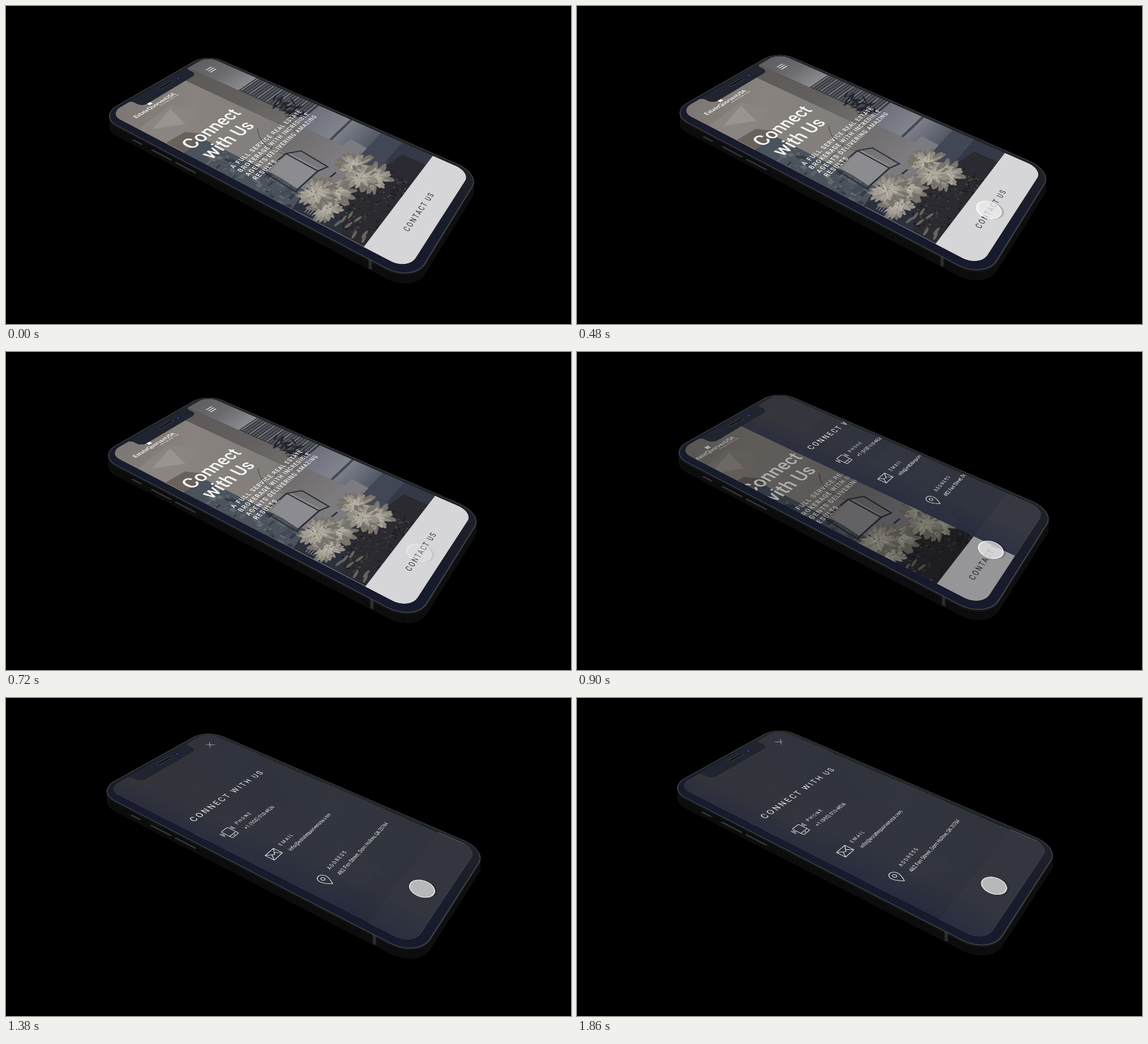
These frames come from a looping animation (998 by 561 pixels, 1.92 s). An HTML page:

```html
<!DOCTYPE html>
<html lang="en">
<head>
<meta charset="utf-8">
<title>Phone contact menu</title>
<style>
html, body { margin: 0; width: 100%; height: 100%; overflow: hidden; background: #000; }
#stage { position: relative; width: 998px; height: 561px; overflow: hidden; }
.plane { position: absolute; left: 0; top: 0; transform-origin: 0 0; }
svg { position: absolute; }
text { font-family: Roboto, "Liberation Sans", sans-serif; white-space: pre; }
</style>
</head>
<body>
<div id="stage"></div>
<script>
const W = 375, H = 812, PAD = 40, LOOP = 1920, STEP = 60;
const RASTER = .7; // drawn close to its size on screen, so text stays crisp
const stage = document.getElementById('stage');

// plane corners: top left, top right, bottom right, bottom left
const START = [[183, 189.5], [356, 89], [828, 297], [719.5, 469.5]];
const END = [[178, 154.5], [356, 55], [842, 264.5], [730, 434.5]];

let seed = 7;
const rnd = (lo = 0, hi = 1) => {
  seed = (seed * 16807) % 2147483647;
  return lo + (hi - lo) * seed / 2147483647;
};
const many = (n, fn) => Array.from({ length: n }, (_, i) => fn(i)).join('');
const label = (x, y, size, str, gap = 0, attrs = '') =>
  `<text x="${x}" y="${y}" font-size="${size}" letter-spacing="${gap}" ${attrs}>${str}</text>`;
const shape = (points, fill) => `<polygon points="${points}" fill="${fill}"/>`;
const box = (x, y, w, h, fill) => `<rect x="${x}" y="${y}" width="${w}" height="${h}" fill="${fill}"/>`;
const fade = (id, dir, ...colors) => `<linearGradient id="${id}" ${dir}>`
  + colors.map((c, i) => `<stop offset="${i / (colors.length - 1)}" stop-color="${c}"/>`).join('') + '</linearGradient>';

function bloom(cx, cy, r) {
  const tones = ['#77736b', '#938f85', '#a5a196', '#b5b1a5', '#c0bcb0'];
  return `<g transform="translate(${cx} ${cy}) scale(1.2 .85)">` + many(75, i => {
    const out = r * (1 - i / 90), len = out * rnd(.38, .52);
    return `<ellipse cx="${out * .55}" rx="${len}" ry="${len * rnd(.2, .34)}" fill="${tones[i * 5 / 75 | 0]}"
      stroke="#8a867c" stroke-width=".5" transform="rotate(${rnd(0, 360)})"/>`;
  }) + many(6, () => `<circle cx="${rnd(-r, r) * .5}" cy="${rnd(-r, r) * .5}" r="1.8" fill="#6a5d4c"/>`) + '</g>';
}

function room() {
  return box(-10, 0, 480, 812, 'url(#wall)')
    + shape('0,95 120,85 150,150 60,185 0,180', '#8a8580')
    + shape('20,120 110,95 85,165', '#98948f')
    + shape('0,180 60,185 90,235 0,250', '#69625c')
    // beam and ceiling
    + box(235, 0, 60, 430, 'url(#beam)')
    + box(292, 0, 180, 175, 'url(#ceiling)')
    // window with blinds and plant
    + box(292, 172, 180, 205, '#3b3e45')
    + many(22, i => box(296, 176 + i * 9, 170, 3.2, i % 3 ? '#5d6068' : '#83858b'))
    + many(24, () => `<ellipse cx="${rnd(290, 345)}" cy="${rnd(265, 365)}" rx="15" ry="2.5" fill="#202229" transform="rotate(${rnd(-60, 60)} 315 310)"/>`)
    // sofa and floor
    + box(262, 375, 210, 185, 'url(#sofa)')
    + box(262, 470, 210, 7, '#454854')
    + box(150, 400, 115, 195, 'url(#table)')
    + shape('0,500 300,510 290,600 0,600', '#7c7b80')
    + box(0, 590, 470, 230, '#353947')
    + box(190, 560, 280, 60, '#424756')
    // city behind the left window
    + box(-5, 235, 72, 300, '#4a525c')
    + many(46, () => box(rnd(-4, 48), rnd(270, 515), rnd(6, 20), rnd(4, 16),
        ['#343c46', '#414b55', '#58626c', '#66686a'][Math.floor(rnd(0, 4))]))
    + many(60, () => box(rnd(0, 62), rnd(290, 525), 2, 2, '#85857f'))
    + shape('0,530 80,520 75,690 0,700', '#2b303c')
    // branches
    + '<path d="M150 430Q120 360 185 310M135 400Q105 370 70 390M140 380Q185 370 205 345" fill="none" stroke="#4a4643" stroke-width="1.6"/>'
    // chair
    + shape('72,425 155,420 150,505 60,508', '#8b8b90')
    + '<path d="M60 415L148 418L142 510L50 506ZM148 418L180 440L170 520L142 510M50 506L60 535L165 545" fill="none" stroke="#2c2f37" stroke-width="4"/>'
    + many(9, i => box(8, 555 + i * 6, 55, 2.5, '#777a80'))
    // foliage and flowers
    + shape('0,650 120,600 330,640 330,705 0,705', '#2b2a30')
    + many(150, () => `<circle cx="${rnd(20, 260)}" cy="${rnd(625, 702)}" r="${rnd(1, 3.2)}" fill="${rnd() < .5 ? '#4b423d' : '#1b1c22'}"/>`)
    + many(8, () => `<ellipse cx="${rnd(0, 70)}" cy="${rnd(630, 690)}" rx="13" ry="3" fill="#68655f" transform="rotate(${rnd(-12, 12)} 50 670)"/>`)
    + bloom(48, 588, 48) + bloom(205, 622, 56) + bloom(105, 575, 54)
    + bloom(215, 570, 58) + bloom(75, 545, 56) + bloom(185, 600, 50);
}

function page() {
  const lines = ['A FULL SERVICE REAL ESTATE', 'BROKERAGE WITH INCREDIBLE', 'AGENTS DELIVERING AMAZING', 'RESULTS.'];
  return room()
    + '<g fill="#f4f4f4">'
    + label(26, 62, 16.5, 'EstateQuorvenUSA', 0, 'font-weight="700" style="font-family:Lato,sans-serif"')
    + label(104, 70, 5.5, 'YOUR HOME SEARCH TEAM')
    + box(88, 36, 11, 11, '#f0f0f0')
    + many(3, i => box(313, 43 + i * 8, 25, 2.6, '#f4f4f4'))
    + label(18, 242, 52, 'Connect', 0, 'font-weight="500"')
    + label(19, 299, 52, 'with Us', 0, 'font-weight="500"')
    + lines.map((s, i) => label(26, 356 + i * 20.8, 17, s, 2.4, 'font-weight="500"')).join('')
    + '</g>'
    + box(-5, 703, 480, 115, '#d6d6d9')
    + label(95, 760, 18.5, 'CONTACT US', 4, 'fill="#2b2c33"');
}

function menu() {
  const row = (y, head, body) => label(89, y, 13, head, 3.3) + label(88, y + 27, 14, body);
  return box(0, 0, W, H, 'url(#menuFill)')
    + box(0, 0, W, H, 'url(#tint)')
    + '<g fill="#f2f2f4">'
    + label(33, 238, 23.5, 'CONNECT WITH US', 5.1)
    + row(318, 'PHONE', '+1 (555) 010-4826')
    + row(439, 'EMAIL', 'info@estatequorvenusa.com')
    + row(565, 'ADDRESS', '482 Fen Street, Dorn Hollow, QK 20764')
    + '</g><g fill="none" stroke="#e4e4e6" stroke-width="1.8">'
    + '<path d="M46 307h17q3 0 3 3v26q0 3-3 3h-17q-3 0-3-3v-26q0-3 3-3zM43 331h23M52 335h5M39 312v9M35 309v15M70 312v9M74 309v15"/>'
    + '<path d="M39 430h32v24h-32zM39 430l16 14l16-14M39 454l11-14M71 454l-11-14"/>'
    + '<path d="M54 592Q42 577 42 568A12 12 0 0 1 66 568Q66 577 54 592Z"/><circle cx="54" cy="568" r="4.5"/>'
    + '</g><path id="close" d="M316 38l22 20M338 38l-22 20" stroke="#a5a5a8" stroke-width="1.8"/>';
}

const body = attrs => `<rect x="-24" y="-10" width="409" height="832" rx="58" ${attrs}/>`;

function addPlane(content) {
  const el = document.createElement('div'), w = W + 2 * PAD, h = H + 2 * PAD;
  el.className = 'plane';
  el.innerHTML = `<svg viewBox="${-PAD} ${-PAD} ${w} ${h}" width="${w * RASTER}" height="${h * RASTER}"
    style="left:${-PAD * RASTER}px;top:${-PAD * RASTER}px">${content}</svg>`;
  stage.append(el);
  return el;
}

// stacked outlines give the phone its thickness
const planes = [18, 16, 13, 10, 7, 4, 2].map(drop => {
  const tone = drop > 6 ? '#0a0a0b' : '#121316';
  const keys = drop === 10
    ? '<path d="M-24 101V126M-24 160V216M-24 231V286" stroke="#303238" stroke-width="5" stroke-linecap="round"/>' : '';
  const tick = drop < 18 ? '<path d="M-23 725v7" stroke="#2e2f33" stroke-width="4"/>' : '';
  return { drop, el: addPlane(body(`fill="${tone}" stroke="#141416" stroke-width=".8"`) + keys + tick) };
});

planes.push({ drop: 0, el: addPlane(`
  <defs>
    ${fade('bezel', 'x1="0" y1=".6" x2="1" y2=".3"', '#161a2c', '#1a1d29', '#252629')}
    ${fade('wall', 'x1="0" y1="0" x2=".4" y2="1"', '#7b7672', '#88837e', '#827e7b', '#6b6a70', '#4a4c58')}
    ${fade('beam', 'x1="0" y1="0" x2="0" y2="1"', '#5c5957', '#625f5e', '#75726f')}
    ${fade('ceiling', 'x1="0" y1="0" x2="0" y2="1"', '#5f5f63', '#6b6b6f', '#8c8c90')}
    ${fade('sofa', 'x1="0" y1="0" x2="0" y2="1"', '#6d707b', '#80838c', '#545866')}
    ${fade('table', 'x1="0" y1="0" x2="0" y2="1"', '#716e6f', '#858387')}
    ${fade('menuFill', 'x1="0" y1="0" x2=".6" y2="1"', '#37363b', '#31353f', '#33363f')}
    <linearGradient id="tint">
      <stop stop-color="#1c2142" stop-opacity=".4"/><stop offset=".25" stop-color="#1c2142" stop-opacity="0"/>
    </linearGradient>
    <clipPath id="display"><rect x="-2" width="377" height="801" rx="38"/></clipPath>
  </defs>
  ${body('fill="url(#bezel)" stroke="#3f4145" stroke-width="2.4"')}
  <g clip-path="url(#display)">
    <g id="page">${page()}</g>
    <rect id="dim" x="-2" width="377" height="812"/>
    <g id="menu" opacity=".96">${menu()}</g>
    <g id="touch">
      <circle cx="164" cy="756" r="28" fill="#000" opacity=".14"/>
      <circle cx="161" cy="751" r="27" fill="#fff" fill-opacity=".66" stroke="#fff" stroke-opacity=".85" stroke-width="2"/>
    </g>
  </g>
  <path d="M58-2Q72 0 72 12V18Q72 38 92 38H262Q282 38 282 18V12Q282 0 296-2Z" fill="#20242f"/>
  <rect x="158" y="10" width="52" height="8" rx="4" fill="#11131a" stroke="#4b4d55" stroke-width="1.4"/>
  <circle cx="230" cy="16.5" r="7" fill="#171b36"/><circle cx="230" cy="16.5" r="3.5" fill="#3c4479"/>`) });

const part = Object.fromEntries(['page', 'dim', 'menu', 'touch', 'close'].map(id => [id, document.getElementById(id)]));

// projective transform of the plane onto four corners
function project([[x0, y0], [x1, y1], [x2, y2], [x3, y3]], drop) {
  const ax = x1 - x2, bx = x3 - x2, sx = x0 - x1 + x2 - x3;
  const ay = y1 - y2, by = y3 - y2, sy = y0 - y1 + y2 - y3;
  const den = ax * by - bx * ay, w = W * RASTER, hgt = H * RASTER;
  const g = (sx * by - bx * sy) / den, h = (ax * sy - sx * ay) / den;
  const m = [(x1 - x0 + g * x1) / w, (y1 - y0 + g * y1) / w, 0, g / w,
    (x3 - x0 + h * x3) / hgt, (y3 - y0 + h * y3) / hgt, 0, h / hgt,
    0, 0, 1, 0, x0, y0, 0, 1];
  return `translate(0px, ${drop}px) matrix3d(${m.map(v => v.toFixed(9))})`;
}

const clamp = v => Math.max(0, Math.min(1, v));
const ease = v => (1 - Math.cos(Math.PI * clamp(v))) / 2;
const TOUCH = [[300, 0], [480, 1], [600, 1], [700, .4], [760, .4], [880, 1], [LOOP, 1]];

function track(table, t) {
  const i = table.findIndex(k => t < k[0]);
  if (i < 1) return table[0][1];
  const [ta, a] = table[i - 1], [tb, b] = table[i];
  return a + (b - a) * (t - ta) / (tb - ta);
}

function draw(t) {
  const p = ease(t / 1860);
  const quad = START.map((c, i) => c.map((v, j) => v + (END[i][j] - v) * p));
  planes.forEach(({ el, drop }) => { el.style.transform = project(quad, drop); });
  const s = ease((t - 745) / 300);
  part.page.setAttribute('transform', `translate(${-80 * s} 0)`);
  part.dim.setAttribute('opacity', .57 * s);
  part.menu.setAttribute('transform', `translate(${(W + 2) * (1 - s) - 2} 0)`);
  part.close.setAttribute('opacity', clamp((s - .8) * 5));
  part.touch.setAttribute('opacity', track(TOUCH, t));
}

const origin = performance.now();
function tick() {
  draw(Math.floor((performance.now() - origin) % LOOP / STEP) * STEP);
  requestAnimationFrame(tick);
}
tick();
</script>
</body>
</html>
```
